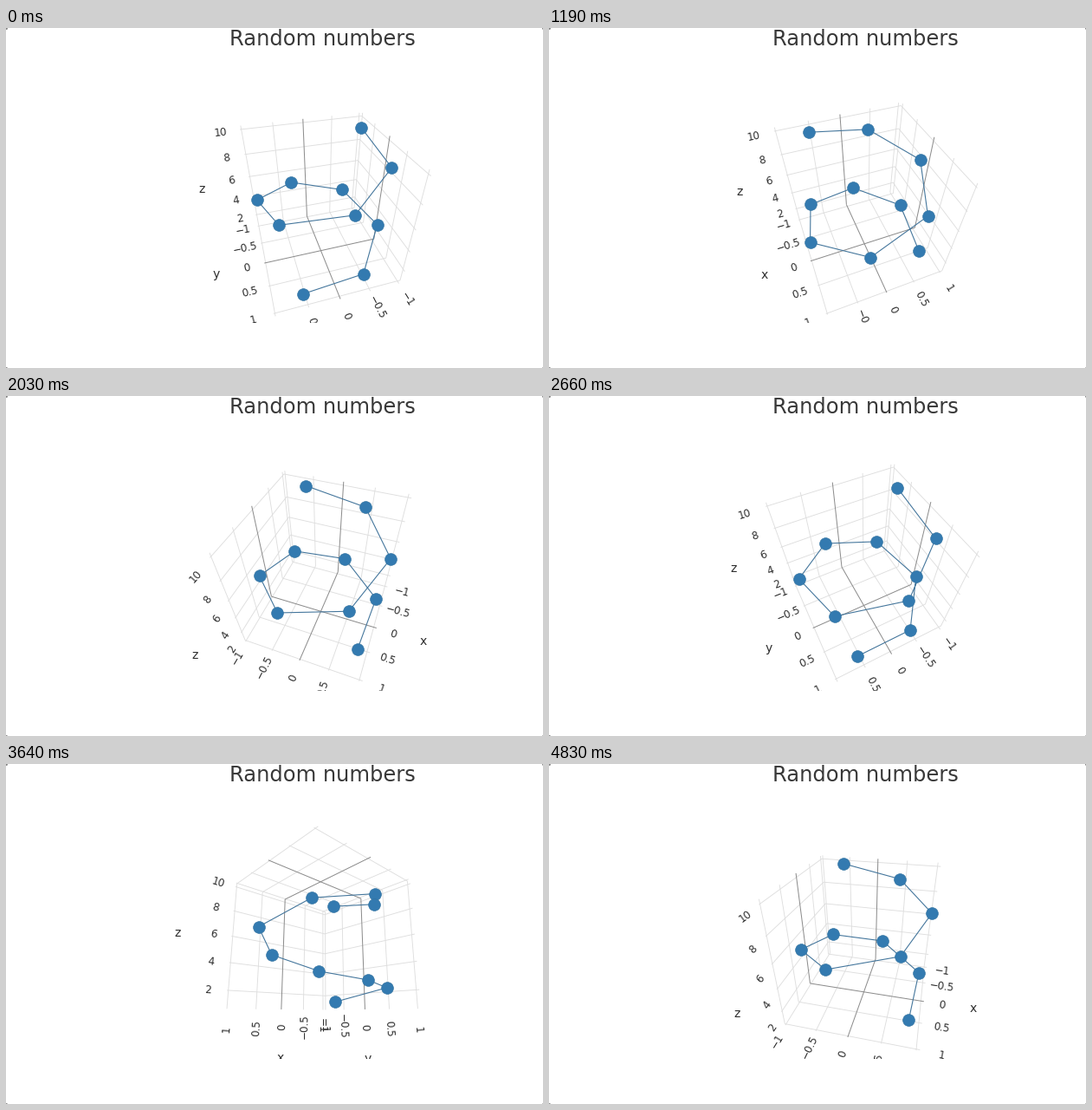
Recreate the animation shown at these times as a matplotlib script. Size 620 by 392 pixels, loop 5460 ms.

```python
import numpy as np
import matplotlib.pyplot as plt
from matplotlib.animation import FuncAnimation
from matplotlib.collections import LineCollection

W, H, DPI = 620, 392, 100
FRAMES, STEP = 78, 70
TOP, BOTTOM = 70, 340            # vertical extent of the 3D scene
CX, CY = 364.7, 204.8
DIST = 1.25 * np.sqrt(3)
FOCAL = (BOTTOM - TOP) / 2 / np.tan(np.pi / 8)
LABEL_GAP, TITLE_GAP = 0.143, 0.388

plt.rcParams["font.family"] = "DejaVu Sans"


def px(n):
    return n * 72 / DPI


# Camera path: time in ms, azimuth and elevation in degrees
CAMERA = np.array([
    (700, 73.3, 37.5), (840, 62, 40), (1050, -1, 47), (1190, -21, 48),
    (1260, -13, 36), (1400, 4, 33), (1610, 12, 33),
    (1820, 12, 33), (2030, 19.8, 48), (2310, 52, 55.5), (2450, 64, 57),
    (2590, 64, 57), (2660, 63.2, 54.2), (2940, 40, 18), (3290, 49, -15.5),
    (3710, 47, -14), (3990, 16.2, 24.8), (4340, 13.3, 31.2),
])


def camera(ms):
    t, az, el = CAMERA.T
    return np.radians([np.interp(ms, t, az), np.interp(ms, t, el)])


def project(points, az, el):
    """Perspective projection of box coordinates to stage pixels."""
    x, y, z = np.asarray(points, float).T
    near = x * np.cos(az) + y * np.sin(az)
    side = y * np.cos(az) - x * np.sin(az)
    rise = z * np.cos(el) - near * np.sin(el)
    scale = FOCAL / (DIST - near * np.cos(el) - z * np.sin(el))
    return np.column_stack([CX + side * scale, CY - rise * scale])


# A helix, scaled into the unit cube with a small margin
t = np.arange(1, 11)
data = np.column_stack([np.cos(t), np.sin(t), t])
low, high = data.min(axis=0), data.max(axis=0)
center, span = (low + high) / 2, (high - low) * 17 / 16
helix = (data - center) / span

ticks = [np.arange(-2, 3) / 2, np.arange(-2, 3) / 2, np.arange(2, 11, 2)]
places = [(v - c) / s for v, c, s in zip(ticks, center, span)]

fig = plt.figure(figsize=(W / DPI, H / DPI), dpi=DPI, facecolor="white")
page = fig.add_axes([0, 0, 1, 1])
page.set(xlim=(0, W), ylim=(H, 0))
page.axis("off")
page.text(365, 20, "Random numbers", size=px(24.1), color="#383838",
          ha="center", va="baseline")
page.scatter([0, W, 0, W], [0, 0, H, H], s=px(3) ** 2, color="#8a8a8a", lw=0)

scene = fig.add_axes([0, 1 - BOTTOM / H, 1, (BOTTOM - TOP) / H])
scene.set(xlim=(0, W), ylim=(BOTTOM, TOP))
scene.axis("off")

grid = LineCollection([], colors="#dedede", linewidths=px(0.9), zorder=1)
zeros = LineCollection([], colors="#8c8c8c", linewidths=px(1), zorder=2)
scene.add_collection(grid)
scene.add_collection(zeros)
path, = scene.plot([], [], color="#44769c", lw=px(1.1), zorder=3)
dots, = scene.plot([], [], "o", ms=px(13.8), mfc="#337ab0", mec="#2f719f",
                   mew=px(0.6), snap=False, zorder=4)


def make_text(s, size):
    return scene.text(0, 0, s, size=px(size), color="#2e2e2e", ha="center",
                      va="center_baseline", rotation_mode="anchor",
                      clip_on=True, zorder=5)


def tick_name(v):
    return f"{v:g}".replace("-", "\u2212")


labels = [[make_text(tick_name(v), 12) for v in vals] for vals in ticks]
titles = [make_text(s, 14) for s in "xyz"]


def grid_lines(back):
    """Tick lines on the three far walls, split into plain and zero lines."""
    plain, zero = [], []
    for axis in range(3):
        for value, place in zip(ticks[axis], places[axis]):
            for along in {0, 1, 2} - {axis}:
                ends = np.array([back, back])
                ends[:, axis] = place
                ends[:, along] = -0.5, 0.5
                (plain if value else zero).append(ends)
    return plain, zero


def label_edges(sign, az, el):
    """For each axis: a point on its labelled edge and the outward direction."""
    front, back = sign / 2, -sign / 2
    out_x, out_y = sign * [1, 0, 0], sign * [0, 1, 0]
    if sign[2] > 0:
        x_edge = (0, front[1], -0.5), out_y
        y_edge = (front[0], 0, -0.5), out_x
    else:
        down = np.array([0, 0, -1])
        x_edge = (0, back[1], -0.5), down
        y_edge = (back[0], 0, -0.5), down
    uprights = [((front[0], back[1], 0), out_x), ((back[0], front[1], 0), out_y)]
    z_edge = min(uprights, key=lambda e: project([e[0]], az, el)[0, 0])
    return x_edge, y_edge, z_edge


def draw(i):
    az, el = camera(i * STEP)
    eye = np.array([np.cos(az) * np.cos(el), np.sin(az) * np.cos(el), np.sin(el)])
    sign = np.where(eye >= 0, 1.0, -1.0)

    for lines, ends in zip((grid, zeros), grid_lines(-sign / 2)):
        lines.set_segments([project(e, az, el) for e in ends])

    for axis, (point, out) in enumerate(label_edges(sign, az, el)):
        point = np.array(point, float)
        for label, place in zip(labels[axis], places[axis]):
            base = point.copy()
            base[axis] = place
            a, b = project([base, base + LABEL_GAP * out], az, el)
            dx, dy = b - a
            if dx < 0:
                dx, dy = -dx, -dy
            label.set_position(b)
            label.set_rotation(np.degrees(np.arctan2(-dy, dx)))
        x, y = project([point + TITLE_GAP * out], az, el)[0]
        titles[axis].set_position((x, y - 1.5))

    spots = project(helix, az, el).T
    path.set_data(*spots)
    dots.set_data(*spots)
    return []


anim = FuncAnimation(fig, draw, frames=FRAMES, interval=STEP, repeat=True,
                     repeat_delay=0, init_func=lambda: draw(0))
plt.show()
```
